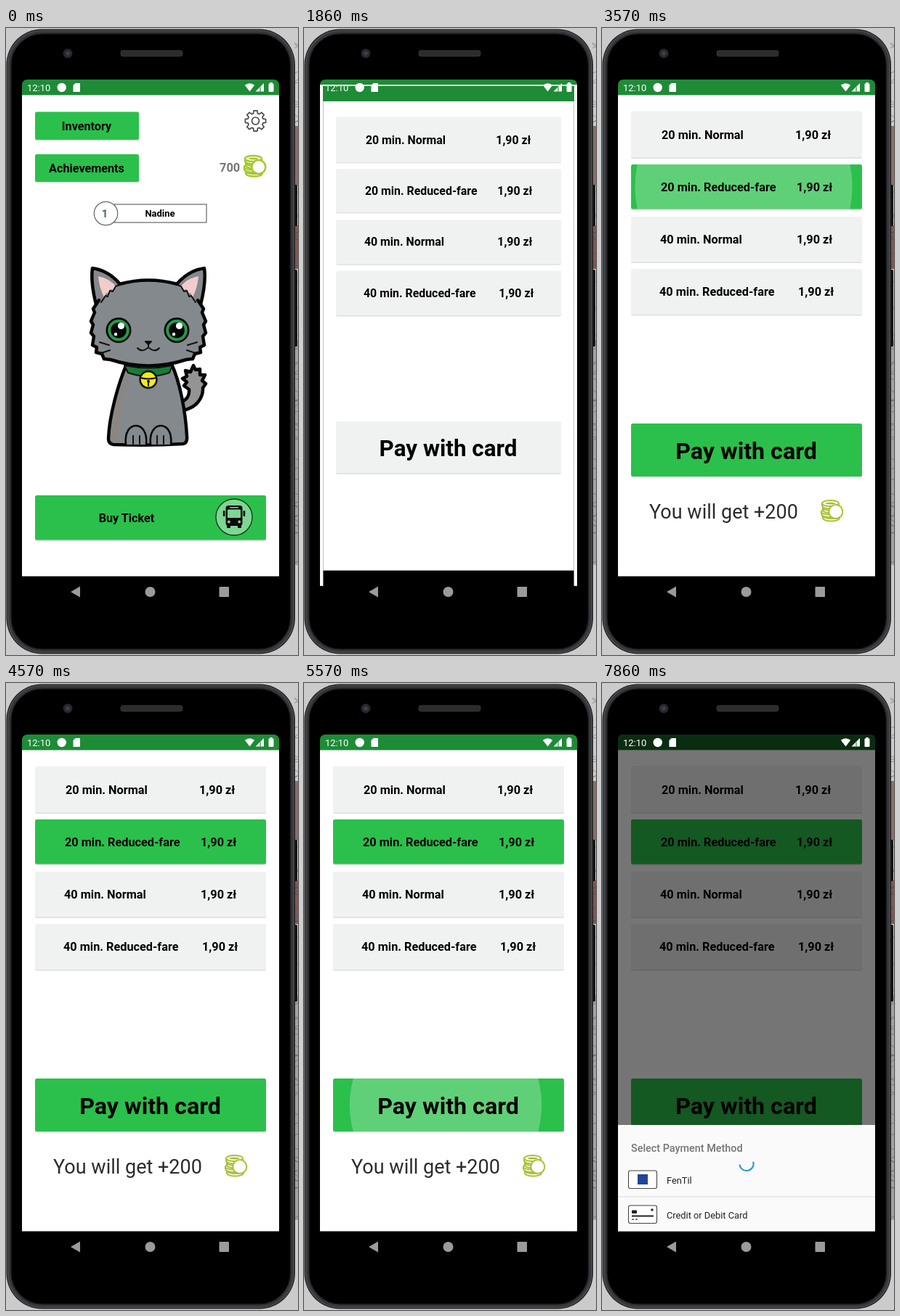
Recreate the animation shown at these times as an HTML page. Size 402 by 864 pixels, loop 8 s.

```html
<!DOCTYPE html>
<html lang="en">
<head>
<meta charset="utf-8">
<title>Ticket app</title>
<style>
html, body { margin: 0; width: 100%; height: 100%; overflow: hidden; background: #cbcbcb; }
svg { display: block; width: 402px; height: 864px; }
text { font-family: Roboto, "Noto Sans", sans-serif; }
.b { font-weight: 700; }
.m { font-weight: 500; }
</style>
</head>
<body>
<svg id="stage" viewBox="0 0 402 864" xmlns="http://www.w3.org/2000/svg"></svg>
<script>
const LOOP = 8000;
const GREEN = '#2bc04b', BAR = '#1e8b36', GREY = '#f0f2f1';
const stage = document.getElementById('stage');
const $ = id => document.getElementById(id);

// ---- markup helpers ----
const rect = (x, y, w, h, fill, more = '') =>
  `<rect x="${x}" y="${y}" width="${w}" height="${h}" fill="${fill}" ${more}/>`;
const circle = (x, y, r, fill, more = '') =>
  `<circle cx="${x}" cy="${y}" r="${r}" fill="${fill}" ${more}/>`;
const path = (d, fill = 'none', more = '') => `<path d="${d}" fill="${fill}" ${more}/>`;
const text = (x, y, size, str, more = 'class="b"') =>
  `<text x="${x}" y="${y}" font-size="${size}" ${more}>${str}</text>`;
const mid = 'class="b" text-anchor="middle"';

function button(x, y, w, h, fill, id = '') {
  const box = `x="${x}" y="${y}" width="${w}" height="${h}" rx="2.5"`;
  return rect(x, y + 1.5, w, h, '#000', 'rx="2.5" opacity=".13"') +
    `<rect ${box} fill="${fill}" ${id && `id="${id}"`}/>` +
    (id && `<clipPath id="${id}Clip"><rect ${box}/></clipPath>
      <g clip-path="url(#${id}Clip)"><circle id="${id}Ripple" cx="${x + w / 2 - 4}" cy="${y + h / 2}" r="0" fill="#fff"/></g>`);
}

function gear(cx, cy) {
  const pts = [];
  for (let i = 0; i < 8; i++) {
    for (const [off, r] of [[-.27, 10.8], [-.17, 14.3], [.17, 14.3], [.27, 10.8]]) {
      const a = i * Math.PI / 4 + off;
      pts.push((cx + r * Math.cos(a)).toFixed(1) + ' ' + (cy + r * Math.sin(a)).toFixed(1));
    }
  }
  const line = 'stroke="#4c4c4c" stroke-width="1.7" stroke-linejoin="round"';
  return path('M' + pts.join('L') + 'Z', 'none', line) + circle(cx, cy, 5, 'none', line);
}

function coins(x, y, lime, weight) {
  let s = `<g transform="translate(${x} ${y})" stroke="${lime}" stroke-width="${weight}">`;
  for (const [dx, dy] of [[2, 22], [0, 16.5], [2, 11], [1, 5]]) {
    s += path(`M${dx} ${dy}v3c0 6 23 6 23 0v-3`, '#fff') +
      `<ellipse cx="${dx + 11.5}" cy="${dy}" rx="11.5" ry="4" fill="#fff"/>`;
  }
  return s + `<ellipse cx="12.5" cy="5" rx="7" ry="1.5" fill="${lime}" stroke="none"/>` +
    circle(19.8, 16.5, 9.5, '#fff') + '</g>';
}

function cat() {
  const ink = 'stroke="#060606" stroke-width="4.5" stroke-linejoin="round" stroke-linecap="round"';
  const thin = 'stroke="#111" stroke-width="2" stroke-linecap="round" stroke-linejoin="round"';
  const flip = body => body + `<g transform="matrix(-1 0 0 1 392 0)">${body}</g>`;
  const cheek = [[128, 375], [120, 387], [122, 392], [117, 404], [120, 409], [117, 420], [121, 425],
    [119, 437], [125, 440], [124, 447], [132, 449], [135, 456], [144, 457]];
  const right = cheek.map(([x, y]) => `${392 - x} ${y}`).join('L');
  const left = cheek.map(p => p.join(' ')).reverse().join('L');
  const tail = path('M243 527C262 524 272 509 271 496L275 490L270 486L274 478L267 478L267 470L261 471L258 465L254 474L247 472L249 480L243 483L249 488L245 493L252 498C253 508 248 513 240 516Z', '#949494', ink);
  const body = path('M166 463C154 492 142 535 141 566Q141 573 148 574Q198 576 244 573Q250 572 249 562C247 528 240 490 228 463Z', '#84898d', ink) +
    path('M166 477C154 510 147 540 146 570L155 571C154 540 159 507 170 480Z', '#8d8580');
  const paw = path('M165 574C163 556 171 548 179 548S195 557 193 574', '#84898d', ink.replace('4.5', '2.6')) +
    path('M175 562v11M184 562v11', 'none', thin);
  const collar = path('M163 465Q196 472 229 465L225 475Q196 485 168 475Z', '#187c38', thin);
  const bell = circle(196, 484.5, 11.5, '#f6ea18', 'stroke="#111" stroke-width="2.4"') +
    path('M185 482Q196 485 207 482', 'none', thin) + path('M196 486v7', 'none', thin) + circle(196, 487, 2, '#111');
  const ear = path('M124 381C119 361 117 345 119 331Q141 334 157 353L150 372Z', '#84898d', ink);
  const innerEar = path('M127 342Q143 345 152 357L147 361L144 360L142 366L138 365L135 371Q128 357 127 342Z', '#f2cbcd') +
    path('M131 378L137 369L140 370L143 362L147 363L151 356L156 354', 'none', thin);
  const outline = `L${right}Q196 474 ${left}`;
  const head = path(`M156 353Q196 342 236 353${outline}Z`, '#84898d') +
    path('M156 353Q196 342 236 353', 'none', ink) + path('M' + outline.slice(1), 'none', ink);
  const eye = x => circle(x, 416.5, 17.5, '#070707') + circle(x, 416.5, 14.8, '#27994a') +
    circle(x, 416.5, 10.8, '#070707') + circle(x + 3.5, 410.5, 4.6, '#fff') + circle(x - 4, 422, 2.2, '#fff');
  const whisker = path('M129 433L142 437M131 448L143 444', 'none', thin);
  const mouth = path('M192 432h8l-4 4Z', '#111', thin) +
    path('M196 436v4M181 441Q187 448 196 440Q205 448 211 441', 'none', thin);
  return tail + body + flip(paw) + collar + flip(ear) + head + flip(innerEar) +
    eye(155) + eye(235) + flip(whisker) + mouth + bell;
}

function bus() {
  const black = '#0a0a0a', pale = '#7dd692';
  return circle(314, 674, 25, pale, 'stroke="#14351c" stroke-width="1.3"') +
    rect(302.5, 658, 23, 28, black, 'rx="4"') +
    rect(298.8, 665, 2.6, 8, black, 'rx="1"') + rect(326.6, 665, 2.6, 8, black, 'rx="1"') +
    rect(304, 684, 5, 5, black, 'rx="1"') + rect(319, 684, 5, 5, black, 'rx="1"') +
    rect(305, 663.5, 18, 11.5, pale, 'rx="1"') + rect(308, 660, 12, 1.5, pale) +
    circle(306.8, 680.5, 1.9, pale) + circle(321.2, 680.5, 1.9, pale);
}

const windowBase = rect(22, 71, 354, 740, '#000') + rect(22, 92, 354, 663.5, '#fff') + rect(22, 71, 354, 21.5, BAR);

function home() {
  const line = 'stroke="#666" stroke-width="1.2"';
  return windowBase +
    button(40, 115.5, 143, 38.5, GREEN) + text(111, 141, 16.2, 'Inventory', mid) +
    button(40, 174, 143, 38, GREEN) + text(111, 199, 16.2, 'Achievements', mid) +
    gear(343.5, 128) + text(294, 198, 16.4, '700', 'class="b" fill="#757575"') + coins(328, 175, '#a5c82e', 2.4) +
    rect(149, 243, 127, 25, '#fff', line) + text(212, 259.5, 13, 'Nadine', mid) +
    circle(137.5, 255.5, 16.2, '#fff', line) + text(136, 261, 15, '1', mid + ' fill="#3c7a44"') +
    cat() + button(40, 644, 318, 61.5, GREEN, 'buy') + text(166, 681, 16.2, 'Buy Ticket', mid) + bus();
}

const fares = [
  ['20 min. Normal', 114.5, 64, 82, 266],
  ['20 min. Reduced-fare', 188, 61.5, 81, 268],
  ['40 min. Normal', 260, 62.5, 80, 268],
  ['40 min. Reduced-fare', 332, 63, 79, 270]
];

function tickets() {
  const rows = fares.map(([label, y, h, x, px], i) => {
    const base = 152.5 + i * 72.2;
    return button(40, y, 318, h, GREY, 'fare' + i) + text(x, base, 16.3, label) + text(px, base, 16.3, '1,90 zł');
  });
  return windowBase + rows.join('') +
    button(40, 545, 318, 73, GREY, 'pay') + text(198.5, 594, 32.2, 'Pay with card', mid) +
    `<g id="reward">${text(65, 676, 27, 'You will get +200', 'fill="#2c2c2c"')}${coins(302, 650, '#a9c136', 2)}</g>`;
}

function sheet() {
  const card = y => rect(36.5, y, 39, 24.5, '#fff', 'rx="2.5" stroke="#444" stroke-width="1.1"');
  return `<g id="sheet">${rect(22, 0, 354, 160, '#fafafa')}
    <g id="methods">${text(40, 37, 14.4, 'Select Payment Method', 'class="m" fill="#757575"')}
    ${card(63)}${rect(49, 68, 14, 14, '#20459a')}${text(89, 80.5, 12.8, 'FenTil', 'fill="#222"')}
    ${rect(22, 98.5, 354, 1, '#dcdcdc')}
    ${card(111)}${rect(41, 117.5, 7, 4.5, '#222', 'rx="1"')}${circle(69, 117, 1.7, '#222')}
    ${rect(41, 124.5, 30, 2, '#222')}${rect(41, 129.5, 3, 1.2, '#222')}${rect(46, 129.5, 3, 1.2, '#222')}
    ${text(89, 128.5, 12.8, 'Credit or Debit Card', 'fill="#222"')}</g>
    </g>`;
}

function statusIcons() {
  return `<g fill="#fff">${text(29, 87, 13, '12:10', '')}
    ${circle(76.7, 82, 6.2, '#fff')}
    ${path('M95.5 76H102V88H92.5V79Z', '#fff')}
    ${path('M328.8 78.8Q335.5 73.5 342.2 78.8L335.5 87.5Z', '#fff')}
    ${path('M355 76V87.5H343.5Z', '#fff')}${path('M351 80.5V87.5H349V82.5Z', BAR, 'opacity=".6"')}
    ${rect(361.5, 76.5, 7, 11.5, '#fff', 'rx="1"')}${rect(363.3, 75, 3.4, 2, '#fff')}</g>`;
}

function backdrop() {
  let s = rect(0, 0, 402, 864, '#cbcbcb');
  s += rect(396, 135, 6, 82, '#8d6d66') + rect(396, 272, 6, 60, '#85564f') + rect(396, 430, 6, 310, '#a3a3a3');
  let seed = 7;
  const rnd = () => (seed = seed * 16807 % 2147483647) / 2147483647;
  for (let i = 0; i < 60; i++) {
    const y = 20 + rnd() * 720;
    s += path(`M397 ${y.toFixed(1)}l6 ${(rnd() * 10 - 5).toFixed(1)}`, 'none', 'stroke="#444" stroke-width=".8" opacity=".55"');
  }
  return s;
}

function phone() {
  return rect(396, 216, 5, 57, '#121212', 'rx="1.5"') + rect(396, 333, 5, 106, '#121212', 'rx="1.5"') +
    rect(.5, 1.5, 397.5, 861, '#1a1b1c', 'rx="49"') +
    rect(2.5, 3.5, 393.5, 857, '#35373a', 'rx="47" stroke="#4b4d51" stroke-width="1.6"') +
    rect(7, 8, 384.5, 848, '#000', 'rx="43" stroke="#1c1d1f" stroke-width="1.4"') +
    circle(85, 35, 6.5, '#26282b') + circle(85, 35, 3, '#3a3f49') +
    rect(158, 31, 85, 8, '#2c2c2c', 'rx="3" stroke="#3d3d3d" stroke-width=".8"');
}

const nav = path('M89 777L102 769.5V784.5Z', '#9b9b9b') + circle(198.5, 777, 7, '#9b9b9b') +
  rect(293.5, 770, 13.5, 14, '#9b9b9b', 'rx="1"');

stage.innerHTML = backdrop() + phone() +
  `<clipPath id="screen"><path d="M22 801V79Q22 71 30 71H368Q376 71 376 79V801Z"/></clipPath>
  <clipPath id="app"><rect x="22" y="71" width="354" height="684.5"/></clipPath>
  <g clip-path="url(#screen)"><g id="home">${home()}</g><g id="tickets">${tickets()}</g>
  <g id="dim">${rect(22, 92.5, 354, 663, '#000', 'opacity=".54"')}${rect(22, 71, 354, 21.5, '#000', 'opacity=".68"')}</g>
  <g clip-path="url(#app)">${sheet()}</g>
  <path id="spinner" fill="none" stroke="#2596d1" stroke-width="2"/></g>` + statusIcons() + nav;

// ---- motion ----
const clamp = v => Math.max(0, Math.min(1, v));
const span = (t, a, b) => clamp((t - a) / (b - a));
const cubic = (a, b, c, d, s) => {
  const q = 1 - s;
  return q * q * q * a + 3 * q * q * s * b + 3 * q * s * s * c + s * s * s * d;
};

// y on a bezier easing segment at a given x
function bez(x, p, q, r, s) {
  let lo = 0, hi = 1;
  for (let i = 0; i < 24; i++) {
    const m = (lo + hi) / 2;
    if (cubic(p[0], q[0], r[0], s[0], m) < x) lo = m; else hi = m;
  }
  return cubic(p[1], q[1], r[1], s[1], lo);
}
const smooth = x => bez(x, [0, 0], [.4, 0], [.2, 1], [1, 1]);
const slowIn = x => x < 1 / 6
  ? bez(x, [0, 0], [.05, 0], [.1333, .06], [1 / 6, .4])
  : bez(x, [1 / 6, .4], [.2083, .82], [.25, 1], [1, 1]);
const out = x => 1 - Math.pow(1 - x, 3);

function ripple(id, t, start) {
  const el = $(id + 'Ripple');
  const k = span(t, start, start + 220);
  el.setAttribute('r', t < start ? 0 : 30 + 128 * out(k));
  el.setAttribute('opacity', .25 * (1 - span(t, start + 200, start + 480)));
}

function zoom(id, s) {
  $(id).setAttribute('transform', `translate(199 436) scale(${s}) translate(-199 -436)`);
}

function show(id, on) {
  $(id).setAttribute('display', on ? 'inline' : 'none');
}

function spinner(t, t0, cy, turn) {
  const u = (t - t0) / 1333 % 1;
  const head = 15 + 270 * smooth(clamp(2 * u));
  const tail = 270 * smooth(clamp(2 * u - 1));
  const base = turn + (t - t0) * .16 + Math.floor((t - t0) / 1333) * 270;
  const at = deg => {
    const a = (base + deg) * Math.PI / 180;
    return (199 + 9.6 * Math.cos(a)).toFixed(2) + ' ' + (cy + 9.6 * Math.sin(a)).toFixed(2);
  };
  $('spinner').setAttribute('d', `M${at(tail)}A9.6 9.6 0 ${head - tail > 180 ? 1 : 0} 1 ${at(head)}`);
}

function draw(t) {
  const u = span(t, 1565, 2570), k = slowIn(u);
  zoom('home', 1 + .05 * k);
  zoom('tickets', .85 + .15 * k);
  show('home', u < 1);
  show('tickets', u > 0);
  $('tickets').setAttribute('opacity', span(u, .04, .14));

  const picked = t >= 3500;
  $('fare1').setAttribute('fill', picked ? GREEN : GREY);
  $('pay').setAttribute('fill', picked ? GREEN : GREY);
  show('reward', picked);
  ripple('buy', t, 1400);
  ripple('fare1', t, 3440);
  ripple('pay', t, 5480);

  $('dim').setAttribute('opacity', span(t, 5580, 5720));
  const y = 755.5 - 108.5 * out(span(t, 5620, 5880)) - 38 * out(span(t, 6930, 7090));
  $('sheet').setAttribute('transform', `translate(0 ${y})`);
  show('methods', t >= 6930);

  const loading = t >= 6087 && t < 6930, paying = t >= 7560;
  show('spinner', loading || paying);
  if (loading) spinner(t, 6087, 700, -109);
  if (paying) spinner(Math.max(t, 7581), 7581, 662.5, -62);
}

const began = performance.now();
function tick() {
  draw((performance.now() - began) % LOOP);
  requestAnimationFrame(tick);
}
tick();
</script>
</body>
</html>
```
